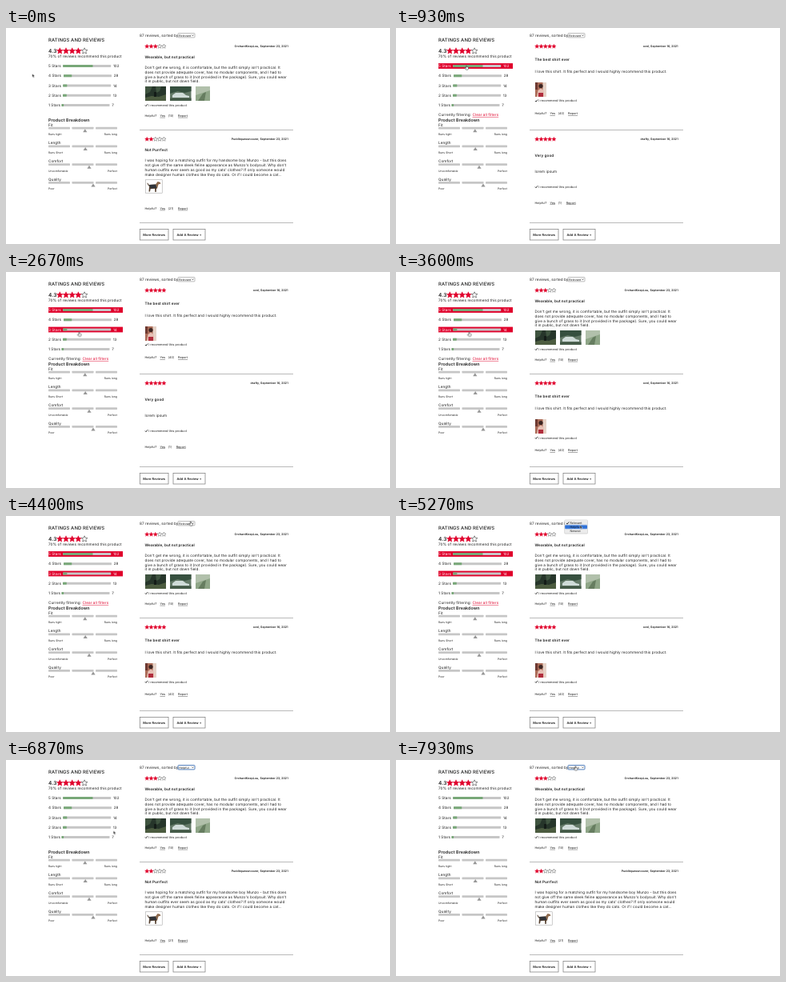
These frames come from a looping animation (480 px wide and 270 px high, 8 s). An HTML page:

```html
<!DOCTYPE html>
<html lang="en">
<head>
<meta charset="utf-8">
<title>Ratings and reviews</title>
<style>
html, body { margin: 0; width: 100%; height: 100%; overflow: hidden; background: #fff; }
svg { display: block; width: 480px; height: 270px; }
text { font-family: Inter, "Open Sans", sans-serif; letter-spacing: .015em; fill: #1c1c1c; text-rendering: geometricPrecision; white-space: pre; }
.b { font-weight: 600; }
.m { font-weight: 500; }
.end { text-anchor: end; }
.mid { text-anchor: middle; }
.u { text-decoration: underline; }
.on text, .pick text { fill: #fff; }

/* one loop = 8s, so 1% = 80ms */
.step { animation: 8s step-end infinite; }
.first { animation-name: first; }
.low { animation-name: low; }
.five { animation-name: five; }
.mixed { animation-name: mixed; }
.filters { animation-name: filters; }
.row5 { animation-name: row5; }
.row4 { animation-name: row4; }
.row3 { animation-name: row3; }
.row2 { animation-name: row2; }
.row1 { animation-name: row1; }
.menu { animation-name: menu; }
.pick { animation-name: pick; }
.relevant { animation-name: relevant; }
.helpful { animation-name: helpful; }
.hand { animation-name: hand; }
.arrow { animation-name: arrow; }
.cursor { animation: move 8s linear infinite; }

@keyframes first { 0%, 35% { visibility: visible } 11.625% { visibility: hidden } }
@keyframes low { 0%, 80.875% { visibility: visible } 11.625% { visibility: hidden } }
@keyframes five { 0%, 35% { visibility: hidden } 11.625% { visibility: visible } 100% { visibility: hidden } }
@keyframes mixed { 0%, 80.875%, 100% { visibility: hidden } 35% { visibility: visible } }
@keyframes filters { 0%, 80.875%, 100% { visibility: hidden } 11.625% { visibility: visible } }
@keyframes row5 { 0%, 80.875%, 100% { visibility: hidden } 6.7% { visibility: visible } }
@keyframes row4 { 0%, 17.25%, 100% { visibility: hidden } 15.6% { visibility: visible } }
@keyframes row3 { 0%, 80.875%, 100% { visibility: hidden } 18.6% { visibility: visible } }
@keyframes row2 { 0%, 88.55%, 100% { visibility: hidden } 87.6% { visibility: visible } }
@keyframes row1 { 0%, 85.05%, 100% { visibility: hidden } 83.8% { visibility: visible } }
@keyframes menu { 0%, 78.375%, 100% { visibility: hidden } 56.625% { visibility: visible } }
@keyframes pick { 0%, 100% { transform: translateY(0) } 65.5% { transform: translateY(4.8px) } }
@keyframes relevant { 0% { visibility: visible } 78.375%, 100% { visibility: hidden } }
@keyframes helpful { 0% { visibility: hidden } 78.375%, 100% { visibility: visible } }
@keyframes hand {
  0%, 46.75%, 56.625%, 83%, 100% { visibility: hidden }
  6.7%, 54.6%, 80.25%, 98.1% { visibility: visible }
}
@keyframes arrow {
  0%, 46.75%, 56.625%, 83% { visibility: visible }
  6.7%, 54.6%, 80.25%, 98.1%, 100% { visibility: hidden }
}
@keyframes move {
  0%, .875% { transform: translate(32.7px, 57.2px) }
  10%, 13.375% { transform: translate(88px, 47px) }
  20%, 22.5% { transform: translate(90.3px, 74.2px) }
  24.5%, 45.875% { transform: translate(91.5px, 75.2px) }
  55%, 62.5% { transform: translate(230.7px, 7px) }
  68%, 78.375% { transform: translate(229.5px, 14.4px) }
  80.375%, 82.5% { transform: translate(112px, 107px) }
  85.875%, 87.5% { transform: translate(134.3px, 88.5px) }
  98.375%, 100% { transform: translate(224.3px, 7.8px) }
}
</style>
</head>
<body>
<svg id="stage" viewBox="0 0 480 270"></svg>
<script>
const RED = '#e0002b', GREY = '#c6c6c6', GREEN = '#78a878';

// y is the middle of the capitals
const text = (x, y, str, size = 4.65, cls = '', extra = '') =>
  `<text x="${x}" y="${(y + size * .36).toFixed(2)}" font-size="${size}" class="${cls}" ${extra}>${str}</text>`;
const rect = (x, y, w, h, fill, extra = '') =>
  `<rect x="${x}" y="${y}" width="${w}" height="${h}" fill="${fill}" ${extra}/>`;
const path = (d, fill, extra = '') => `<path d="${d}" fill="${fill}" ${extra}/>`;
const line = (x1, x2, y) => rect(x1, y, x2 - x1, .6, '#8c8c8c');
const group = (cls, body) => `<g class="${cls}">${body}</g>`;
const at = (x, y, body) => `<g transform="translate(${x} ${y})">${body}</g>`;
const check = (x, y) =>
  path(`M${x} ${y}l1.1 1.2l2-2.6`, 'none', 'stroke="#1c1c1c" stroke-width=".85"');

function star(cx, cy, r, full) {
  const pts = Array.from({ length: 10 }, (_, i) => {
    const a = i * Math.PI / 5 - Math.PI / 2, d = i % 2 ? r * .46 : r;
    return (cx + d * Math.cos(a)).toFixed(2) + ',' + (cy + d * Math.sin(a)).toFixed(2);
  });
  const look = full ? `fill="${RED}" stroke="${RED}"` : 'fill="#fff" stroke="#222"';
  return `<polygon points="${pts.join(' ')}" ${look} stroke-width="${r * .13}" stroke-linejoin="round"/>`;
}
const stars = (x, y, r, gap, count) =>
  [0, 1, 2, 3, 4].map(i => star(x + i * gap, y, r, i < count)).join('');

// Rating rows
const counts = { 5: 102, 4: 28, 3: 14, 2: 13, 1: 7 };
const barX = { 5: 71.2, 4: 72, 3: 71.2, 2: 71, 1: 69.5 };
const total = Object.values(counts).reduce((a, b) => a + b);

function ratingRow(n) {
  const y = 47.5 + (5 - n) * 12.25, x = barX[n];
  const row = text(53, y, `${n} Stars`) +
    rect(x, y - 1.4, 60, 2.8, GREY, 'rx=".5"') +
    rect(x, y - 1.4, 60 * counts[n] / total, 2.8, GREEN, 'rx=".5"') +
    text(x + 62.7, y, counts[n], 4.5);
  return row + group(`step on row${n}`, rect(53, y - 3.4, 93, 6.8, RED) + row);
}

// Product breakdown sliders
function slider(i, label, low, high, mark) {
  const y = 121 + i * 22.75;
  return text(53, y, label) +
    [53, 82.5, 112].map(x => rect(x, y + 2.8, 27, 2.6, GREY, 'rx=".4"')).join('') +
    path(`M${mark} ${y + 5.3}l2.6 4h-5.2z`, '#969696') +
    text(53, y + 11.8, low, 3.4) + text(139, y + 11.8, high, 3.4, 'end');
}

// Thumbnails
const forest = at(174, 73,
  rect(0, 0, 26, 18, '#26352a') +
  path('M0 0h9l-3 7l-6 3zM13 0h7l-2 6l-4 2z', '#3f5440') +
  path('M0 14l8-2l9 1l9-3v8h-26z', '#4c5c40') + rect(11, 7, 3, 6, '#141c18'));
const meadow = at(205, 73,
  rect(0, 0, 26.5, 18, '#647a68') +
  path('M0 0h26.5v6l-8 2l-9-2l-9.500 3z', '#36503f') +
  path('M3 11l4-3h9l4 3l4 1v2h-21z', '#cfdbd8') + rect(0, 14.5, 26.5, 3.5, '#445a48'));
const grass = at(237, 73,
  rect(0, 0, 18, 18, '#8fa688') +
  path('M0 0h18v5l-18 6z', '#b1c0ab') + path('M3 18l6-9l4-2l-2 11z', '#667d60'));
const dog = at(174, 189.500,
  rect(.3, .3, 20.9, 16.4, '#fff', 'stroke="#999" stroke-width=".5"') +
  path('M5 6.500l8-.5l2.500-3.500l3 .8l1 1.700l-3 1l-1.500 5.200l-9 .6z', '#8d6a4e') +
  path('M5 6.500l8-.5l1.500 4.500l-9 1z', '#30343a') +
  path('M5 9l2 .5l-1 5.500h-1.500zM12 10.500h2l-.3 5h-1.400zM5 7l-2-3l-.6.4l2 4z', '#54402f'));
const person = y => at(174, y,
  rect(0, 0, 14, 18, '#ab6c58') + rect(9.500, 0, 4.500, 18, '#e6d3c8') + rect(0, 0, 3, 9, '#6e3a32') +
  '<circle cx="7" cy="4.500" r="2.600" fill="#3c2522"/>' +
  path('M2 18l1.500-8l3.500-2.500l3.500 2.500l1 8z', '#e6bfb4') + rect(4, 13, 6, 5, '#b02c3c'));

// One review; the y values are absolute
function review(o) {
  const tail = o.votes > 9 ? 215 : 212.7;
  return stars(176.2, o.top, 2.75, 5.3, o.stars) +
    text(352.7, o.top, `${o.who}, September ${o.day}, 2021`, 3.55, 'b end') +
    text(173.5, o.titleY, o.title, 4.65, 'b') +
    o.body.map((s, i) => text(173.5, o.bodyY + i * 5.72, s)).join('') +
    (o.photos || '') +
    (o.recY ? check(173.9, o.recY) + text(178, o.recY, 'I recommend this product', 3.85) : '') +
    text(173.5, o.helpY, 'Helpful?', 3.75) + text(192.4, o.helpY, 'Yes', 3.75, 'u') +
    text(202.7, o.helpY, `(${o.votes})`, 3.75) + text(tail, o.helpY, 'Report', 3.75, 'u');
}

const shirt = {
  stars: 5, who: 'ovel', day: 16, title: 'The best shirt ever',
  body: ['I love this shirt. It fits perfect and I would highly recommend this product.']
};

const reviews =
  group('step first', review({
    top: 23, stars: 3, who: 'OrchardKeepLou', day: 23,
    titleY: 36.3, title: 'Wearable, but not practical', bodyY: 49.6,
    body: [
      "Don't get me wrong, it is comfortable, but the outfit simply isn't practical. It",
      'does not provide adequate cover, has no modular components, and I had to',
      'give a bunch of grass to it (not provided in the package). Sure, you could wear',
      'it in public, but not down field.'
    ],
    photos: forest + meadow + grass, recY: 96.5, helpY: 109.5, votes: 10
  })) +
  group('step low', review({
    top: 139, stars: 2, who: 'Puddlepawsnoozer', day: 23,
    titleY: 152.5, title: 'Not Purrfect', bodyY: 165.8,
    body: [
      'I was hoping for a matching outfit for my handsome boy Munzo - but this does',
      "not give off the same sleek feline appearance as Munzo's bodysuit. Why don't",
      "human outfits ever seem as good as my cats' clothes? If only someone would",
      'make designer human clothes like they do cats. Or if I could become a cat...'
    ],
    photos: dog, helpY: 225.4, votes: 21
  })) +
  group('step five',
    review({ ...shirt, top: 23, titleY: 39.2, bodyY: 54.6, photos: person(68), recY: 91, helpY: 106.7, votes: 40 }) +
    review({
      top: 139, stars: 5, who: 'drafty', day: 16, titleY: 159.2, title: 'Very good',
      bodyY: 179.2, body: ['lorem ipsum'], recY: 198.6, helpY: 218.3, votes: 1
    })) +
  group('step mixed',
    review({ ...shirt, top: 139, titleY: 155.2, bodyY: 170.8, photos: person(184), recY: 207.3, helpY: 222.7, votes: 40 }));

// Sort control and its menu
const select = (cls, label, border, width) => group('step ' + cls,
  rect(215, 6.6, 21, 5.3, '#fff', `rx=".8" stroke="${border}" stroke-width="${width}"`) +
  text(216.2, 9.2, label, 3.6) +
  path('M232.300 8.500l1.100 1.300l1.100-1.300', 'none', 'stroke="#222" stroke-width=".6"'));

const menuItems = ['Relevant', 'Helpful', 'Newest'];
const menu = group('step menu',
  rect(210.3, 5.1, 29.6, 17.5, '#000', 'rx="1.600" opacity=".14"') +
  rect(210.7, 4.7, 28.8, 17.1, '#ececec', 'rx="1.400" stroke="#c4c4c4" stroke-width=".3"') +
  `<g class="step pick">${rect(211.2, 6.5, 27.8, 4.8, '#2f72d8', 'rx=".8"')}</g>` +
  menuItems.map((s, i) => text(217.5, 8.9 + i * 4.8, s, 3.6)).join('') + check(213, 8.9));

const button = (x, w, label) =>
  rect(x, 251.6, w, 13.4, '#fff', 'stroke="#777" stroke-width=".7"') +
  text(x + w / 2, 258.4, label, 4, 'b mid');

const outline = 'stroke="#fff" stroke-width=".45" stroke-linejoin="round"';
const cursor = group('cursor',
  group('step arrow', path('M0 0v4.200l1-.9l.7 1.600l.8-.35l-.7-1.500h1.400z', '#111', outline)) +
  group('step hand', path(
    'M-.5 0q.5-.5 1 0v1.700l2 .6v1.700l-.6 1.200h-2.500l-1.700-2.200l.5-.4l1.300.8z',
    '#fff', 'stroke="#222" stroke-width=".5" stroke-linejoin="round"')));

document.getElementById('stage').innerHTML =
  text(53, 15, 'RATINGS AND REVIEWS', 5.95, 'm') +
  text(53, 28.5, '4.3', 6.5, 'b') + stars(67.3, 28.8, 4, 7.7, 4) +
  text(53, 35.5, '70% of reviews recommend this product') +
  [5, 4, 3, 2, 1].map(ratingRow).join('') +
  group('step filters',
    text(53, 108.3, 'Currently filtering:') +
    text(95.5, 108.3, 'Clear all filters', 4.65, 'u', `style="fill:${RED}"`)) +
  text(53, 114.8, 'Product Breakdown', 5.3, 'b') +
  slider(0, 'Fit', 'Runs tight', 'Runs long', 98.8) +
  slider(1, 'Length', 'Runs Short', 'Runs long', 99.2) +
  slider(2, 'Comfort', 'Uncomfortable', 'Perfect', 104) +
  slider(3, 'Quality', 'Poor', 'Perfect', 109) +
  text(167, 9, '87 reviews, sorted by') +
  select('relevant', 'Relevant', '#777', .5) + select('helpful', 'Helpful', '#3b6fb5', .9) +
  reviews + line(167, 359, 127) + line(167, 359, 243) +
  button(167.3, 35.7, 'More Reviews') + button(209, 40, 'Add A Review +') +
  menu + cursor;
</script>
</body>
</html>
```
